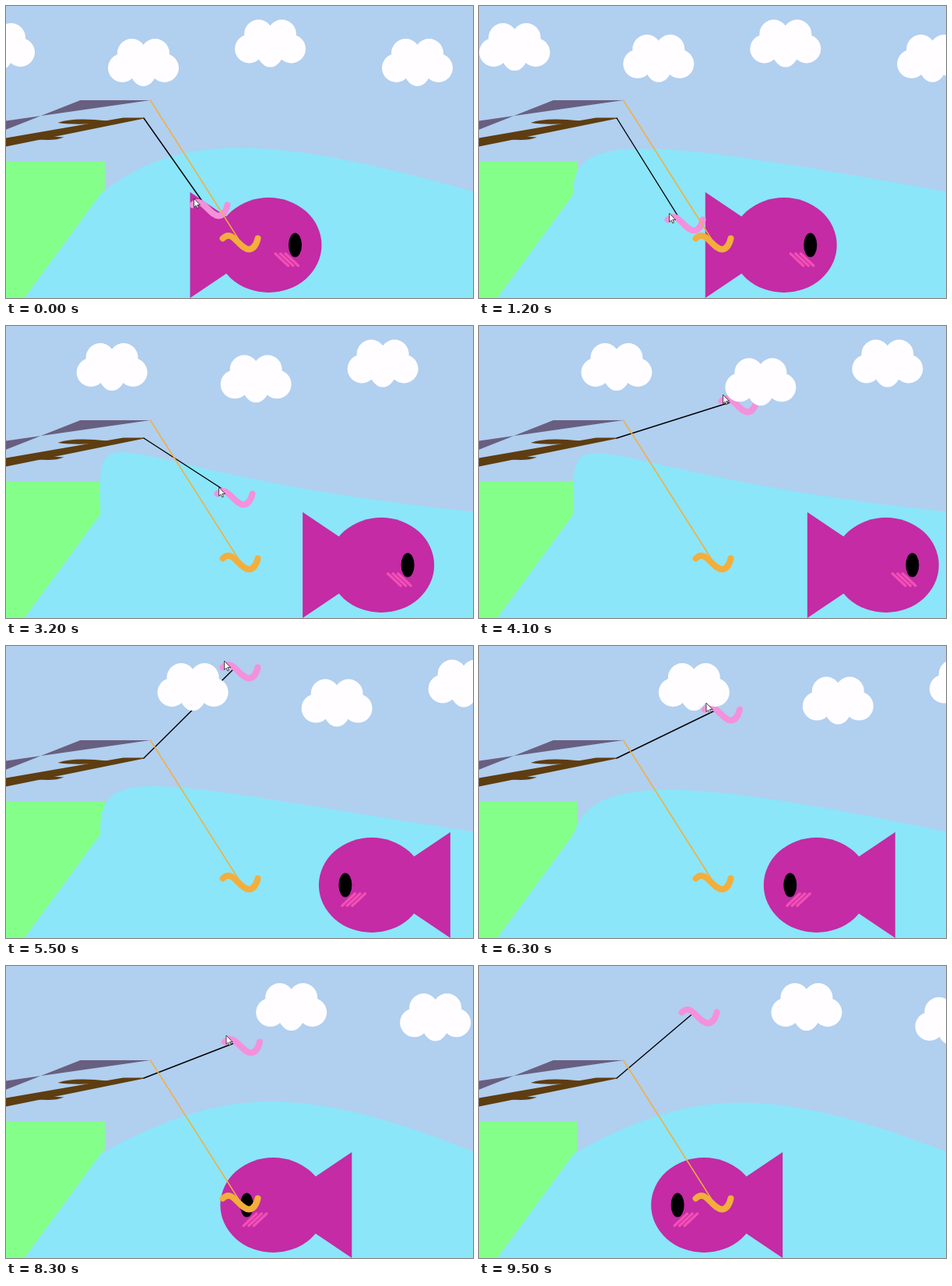
These frames come from a looping animation (600x375 px, 9.6 s). An HTML page with a canvas:

```html
<!DOCTYPE html>
<html lang="en">
<head>
<meta charset="utf-8">
<title>Fishing</title>
<style>
html, body { margin: 0; height: 100%; overflow: hidden; }
canvas { display: block; }
</style>
</head>
<body>
<canvas id="stage" width="600" height="375"></canvas>
<script>
const ctx = document.getElementById('stage').getContext('2d');
const LOOP = 9600, STEP = 100;
const DRIFT = 45.2; // shared speed of clouds and fish, px per second
const TURN_X = 527.5;

// Places the bait is dragged through: seconds, x, y
const baitPath = [
  [0, 239, 255], [1.2, 242, 274], [2.3, 231, 334], [4.1, 311, 96],
  [5.5, 278, 27], [7.1, 301, 135], [9.5, 260, 59]
];

function baitAt(seconds) {
  const next = baitPath.findIndex(([at]) => at > seconds);
  if (next < 0) return baitPath.at(-1).slice(1);
  const [t0, x0, y0] = baitPath[next - 1], [t1, x1, y1] = baitPath[next];
  const k = (seconds - t0) / (t1 - t0);
  return [x0 + (x1 - x0) * k, y0 + (y1 - y0) * k];
}

function fill(path, color) {
  ctx.fillStyle = color;
  ctx.fill(new Path2D(path));
}

function stroke(path, color, width) {
  ctx.strokeStyle = color;
  ctx.lineWidth = width;
  ctx.stroke(new Path2D(path));
}

function oval(x, y, rx, ry, color) {
  ctx.fillStyle = color;
  ctx.beginPath();
  ctx.ellipse(x, y, rx, ry, 0, 0, 2 * Math.PI);
  ctx.fill();
}

function placed(x, y, draw, flip = 1) {
  ctx.save();
  ctx.translate(x, y);
  ctx.scale(flip, 1);
  draw();
  ctx.restore();
}

// The crest leans left and right as the swell rocks between -1 and 1
function water(seconds) {
  const swell = Math.cos(0.6 * (seconds - 3.55));
  const ax = Math.max(117, 133 - 150 * swell);
  const ay = 162 - 31 * swell - 41 * swell ** 2;
  const bx = 250 - 135 * swell;
  const by = 169 + 20 * swell;
  fill(`M22 376L121 241C${ax} ${ay} ${bx} ${by} 600 238V376Z`, '#8be6f9');
}

function rods() {
  fill('M95 120.5H185L-1 147V158.5Z', '#685f80');
  fill('M-1 169L150 143H177V144L-1 180Z', '#5e3d10');
  fill('M66 149.5Q85 142 130 147L136 149Q90 153 66 149.5Z', '#5e3d10');
  fill('M35 170Q60 174 74 168L40 166Z', '#5e3d10');
}

function fish() {
  fill('M-101 -68V68L0 0Z', '#c42ba4');
  oval(0, 0, 68, 61, '#c42ba4');
  oval(34, 0, 8.5, 15.5, '#000');
  for (const x of [8.5, 15, 21.5]) stroke(`M${x} 11l16.5 15.5`, '#f24fb5', 3.4);
}

function worm(color) {
  stroke('M0 0C13 -13 21 14 34 14Q42 13 45 0', color, 8);
}

function cloud() {
  for (const side of [-1, 1]) {
    oval(27 * side, 7, 18.5, 18.5, '#fffdff');
    oval(15 * side, -12, 18.5, 18.5, '#fffdff');
  }
  oval(0, 6, 18, 24.5, '#fffdff');
}

function cursor() {
  const arrow = 'M0 0V11L2.5 8.7L4.3 12.5L6 11.7L4.3 8H7.7Z';
  fill(arrow, '#fff');
  stroke(arrow, '#222', 0.8);
}

function render(seconds) {
  const drift = DRIFT * seconds;
  const bob = 69 + 4.2 * Math.cos(1.1 * (seconds - 5));
  const [baitX, baitY] = baitAt(seconds);

  ctx.setTransform(1, 0, 0, 1, 0.5, 0.5);
  ctx.lineCap = 'round';
  ctx.fillStyle = '#b1cfef';
  ctx.fillRect(-1, -1, 602, 377);
  fill('M-1 199H126.5V235L22 376H-1Z', '#84ff8a');
  water(seconds);
  rods();

  const swim = 337 + drift, back = swim > TURN_X;
  placed(back ? 2 * TURN_X - swim : swim, 306.5, fish, back ? -1 : 1);

  stroke(`M176.5 143.5L${baitX + 16} ${baitY}`, '#000', 1.4);
  placed(baitX, baitY, () => worm('#f391dc'));
  stroke('M185 120.5L298 298.5', '#f3ae3c', 1.4);
  placed(278, 298, () => worm('#f3ae3c'));

  for (const [x, y] of [[-9, 52], [176, bob], [339, 47.5], [528, bob]])
    placed(x + drift, y, cloud);
  if (seconds < 8.4) placed(baitX + 2, baitY - 8, cursor);
}

function tick() {
  const time = performance.now() % LOOP;
  render(Math.floor(time / STEP) * STEP / 1000);
  requestAnimationFrame(tick);
}
tick();
</script>
</body>
</html>
```
